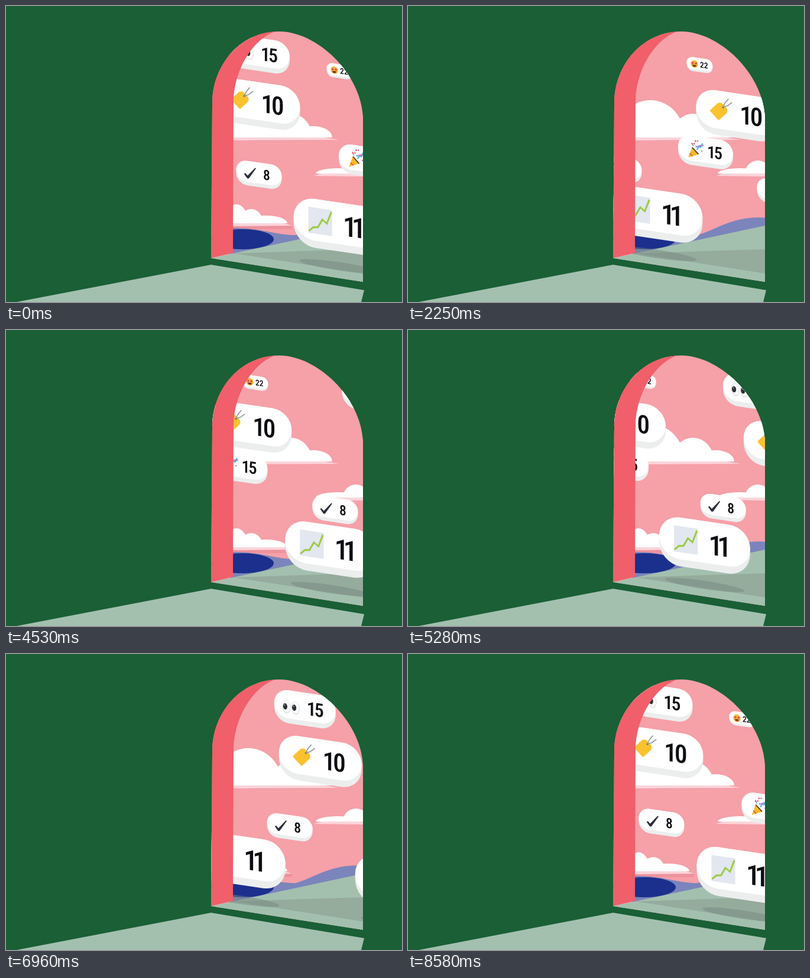
Animation, 670 px wide and 500 px high, one loop 8610 ms. Source, as an HTML page with a canvas:

```html
<!DOCTYPE html>
<html lang="en">
<head>
<meta charset="utf-8">
<style>
html, body { margin: 0; width: 100%; height: 100%; overflow: hidden; background: #1a5f36; }
canvas { display: block; width: 670px; height: 500px; }
</style>
</head>
<body>
<canvas id="stage" width="670" height="500"></canvas>
<script>
const ctx = document.getElementById('stage').getContext('2d');
const LOOP = 8610, STEP = 30, SLOPE = 0.147, TAU = Math.PI * 2;
const GREEN = '#1a5f36', MINT = '#a3c0af', PINK = '#f6a0a8', PALE = '#fbd5db';
const FONT = '500 43px "Roboto Condensed", Roboto, "Liberation Sans", sans-serif';

function trace(points) {
  ctx.beginPath();
  for (const [x, y] of points) ctx.lineTo(x, y);
}
function poly(color, ...points) {
  ctx.fillStyle = color;
  trace(points);
  ctx.fill();
}
function line(color, width, points) {
  ctx.strokeStyle = color;
  ctx.lineWidth = width;
  trace(points);
  ctx.stroke();
}
function oval(color, x, y, rx, ry = rx, from = 0, to = TAU) {
  ctx.fillStyle = color;
  ctx.beginPath();
  ctx.ellipse(x, y, rx, ry, 0, from, to);
  ctx.fill();
}
function box(color, x, y, w, h, r = 0) {
  ctx.fillStyle = color;
  ctx.beginPath();
  ctx.roundRect(x, y, w, h, r);
  ctx.fill();
}
function shape(color, d) {
  ctx.fillStyle = color;
  ctx.fill(new Path2D(d));
}
function seeded(seed) {
  return () => (seed = seed * 16807 % 2147483647) / 2147483647;
}

// Icons use pill units: origin at the pill centre, 140 wide.
function tag() {
  ctx.save();
  ctx.translate(-30.5, 1.5);
  ctx.rotate(-0.82);
  box('#fbc22f', -13, -10.5, 26, 21, [2, 7, 7, 2]);
  oval('#8a7a55', 9, 0, 1.8);
  for (const side of [-1, 1]) line('#8d99a6', 1.5, [[9, 0], [17, side * 3], [27, side * 4]]);
  ctx.restore();
}
function chart() {
  box('#e3e7ef', -47.3, -18.7, 36.6, 40);
  const zigzag = [];
  for (let i = 0; i < 6; i++)
    zigzag.push([-46.4 + 6.9 * i, 18.4 - 6.8 * i + (i % 2 ? 0 : 3 * i)]);
  line('#9ccb45', 2.6, zigzag);
}
function check() {
  poly('#2b2f3c', [-46, 9], [-42, 6], [-35, 13], [-12, -14], [-9, -13], [-31, 21], [-36, 22]);
}
function eyes() {
  for (const x of [-42, -21.5]) {
    oval('#d3d8dc', x, 5.5, 9.6, 15);
    oval('#fafafa', x + 0.3, 5, 8.4, 14);
    oval('#2b2f33', x - 3, 5.5, 4.8, 7);
    oval('#8b9196', x - 4, 2.5, 1.3, 1.8);
  }
}
function party() {
  poly('#f9b928', [-44, 25], [-34, -3], [-17, 13]);
  line('#5b4038', 3, [[-34, -2], [-18, 13]]);
  line('#e2533f', 2.5, [[-40, 14], [-33, 20]]);
  line('#46b4e8', 3, [[-22, 2], [-17, -7], [-13, -5], [-8, -16]]);
  const rand = seeded(11), colors = ['#e8485e', '#46b4e8', '#b86fd0'];
  for (let i = 0; i < 16; i++) {
    const a = -2.1 + rand() * 2.5, r = 8 + rand() * 20;
    oval(colors[i % 3], -26 + r * Math.cos(a), 3 + r * Math.sin(a), 1.8);
  }
}
function star(x, y) {
  const points = [];
  for (let i = 0; i < 10; i++) {
    const a = i * TAU / 10 - TAU / 4, r = i % 2 ? 3.5 : 8;
    points.push([x + r * Math.cos(a), y + r * Math.sin(a)]);
  }
  poly('#e0344c', ...points);
}
function face() {
  oval('#f6b53f', -28.5, 4, 20);
  oval('#5f3720', -28.5, 9, 10, 10, 0, Math.PI);
  star(-37, 0);
  star(-20, 0);
}

// x: left edge at time zero; y: centre height where the track crosses x = 495
const pills = [
  { x: 542.5, y: 98.3, w: 44, gap: 272, laps: 1, text: '22', icon: face },
  { x: 389.5, y: 292, w: 77, gap: 272, laps: 1, text: '8', icon: check },
  { x: 563, y: 242.3, w: 93, gap: 406, laps: 1, text: '15', icon: party },
  { x: 376, y: 87.7, w: 104, gap: 406, laps: 1, text: '15', icon: eyes },
  { x: 357.5, y: 170.7, w: 140, gap: 272, laps: 2, text: '10', icon: tag },
  { x: 486.5, y: 357.1, w: 154, gap: 272, laps: 2, text: '11', icon: chart, shadow: true }
];

function label(text) {
  const tight = -4 * (text.split('1').length - 1); // ones sit close to their neighbours
  ctx.fillStyle = '#0d0e12';
  ctx.font = FONT;
  ctx.fontStretch = 'condensed';
  ctx.textAlign = 'center';
  ctx.letterSpacing = tight + 'px';
  ctx.fillText(text, 23.5 + tight / 2, 18);
}
function drawPill(p, left) {
  const k = p.w / 140, cx = left + p.w / 2;
  ctx.save();
  ctx.translate(cx, p.y + SLOPE * (cx - 495));
  ctx.transform(k, SLOPE * k, 0, k, 0, 0);
  if (p.shadow) oval('rgba(120,135,130,.5)', 0, 66, 61, 6.5);
  box('#eceeee', -70, -32, 140, 75, 34);
  box('#fff', -70, -32, 140, 64, 32);
  p.icon();
  label(p.text);
  ctx.restore();
}

// Half domes [x, radius, height] on a base line, over a pale band tapering to the tip.
function cloud(base, edge, tip, ...domes) {
  poly(PALE, [edge, base - 5], [edge + (tip - edge) * 0.7, base - 5], [tip, base + 4], [edge, base + 5]);
  for (const [x, r, h] of domes) oval('#fff', x, base, r, h, Math.PI, TAU);
}

const opening = new Path2D('M347 426 L349 165 C349 98 398 43 462 43 C526 43 600 113 604 187 L604 466 Z');

function scenery() {
  box(PINK, 340, 40, 270, 430);
  cloud(222, 380, 563, [410, 58, 63], [482, 36, 40], [520, 32, 19]);
  cloud(283, 606, 521, [592, 22, 22], [562, 38, 9]);
  box('#ee939d', 380, 371, 104, 6);
  cloud(367, 380, 484, [390, 20, 32], [415, 20, 24], [440, 36, 13]);
  shape('#7b85bb', 'M380 375 C430 374 456 387 490 387 C522 378 552 353 606 358 L606 420 L380 420 Z');
  oval('#1b2f8c', 400, 394, 53, 17);
  poly(MINT, [347, 426], [384, 418], [604, 371], [606, 467]);
  poly('#95ab9c', [386, 418], [500, 414], [606, 411], [606, 452]);
}

function frame(now) {
  const t = Math.floor((now % LOOP) / STEP) * STEP;
  box(GREEN, 0, 0, 670, 500);
  poly(MINT, [18, 500], [347, 437], [606, 480], [601, 500]);

  ctx.save();
  ctx.clip(opening);
  scenery();
  for (const p of pills) {
    const base = p.x - t / LOOP * p.laps * p.gap;
    for (let i = -1; i <= p.laps; i++) {
      const left = base + i * p.gap;
      if (left < 606 && left + p.w > 380) drawPill(p, left);
    }
  }
  shape('#f05f6a', 'M340 427.5 L384 417 L385 160 C386 110 415 58 455 43 L455 30 L340 30 Z');
  ctx.restore();
  requestAnimationFrame(frame);
}
requestAnimationFrame(frame);
</script>
</body>
</html>
```
